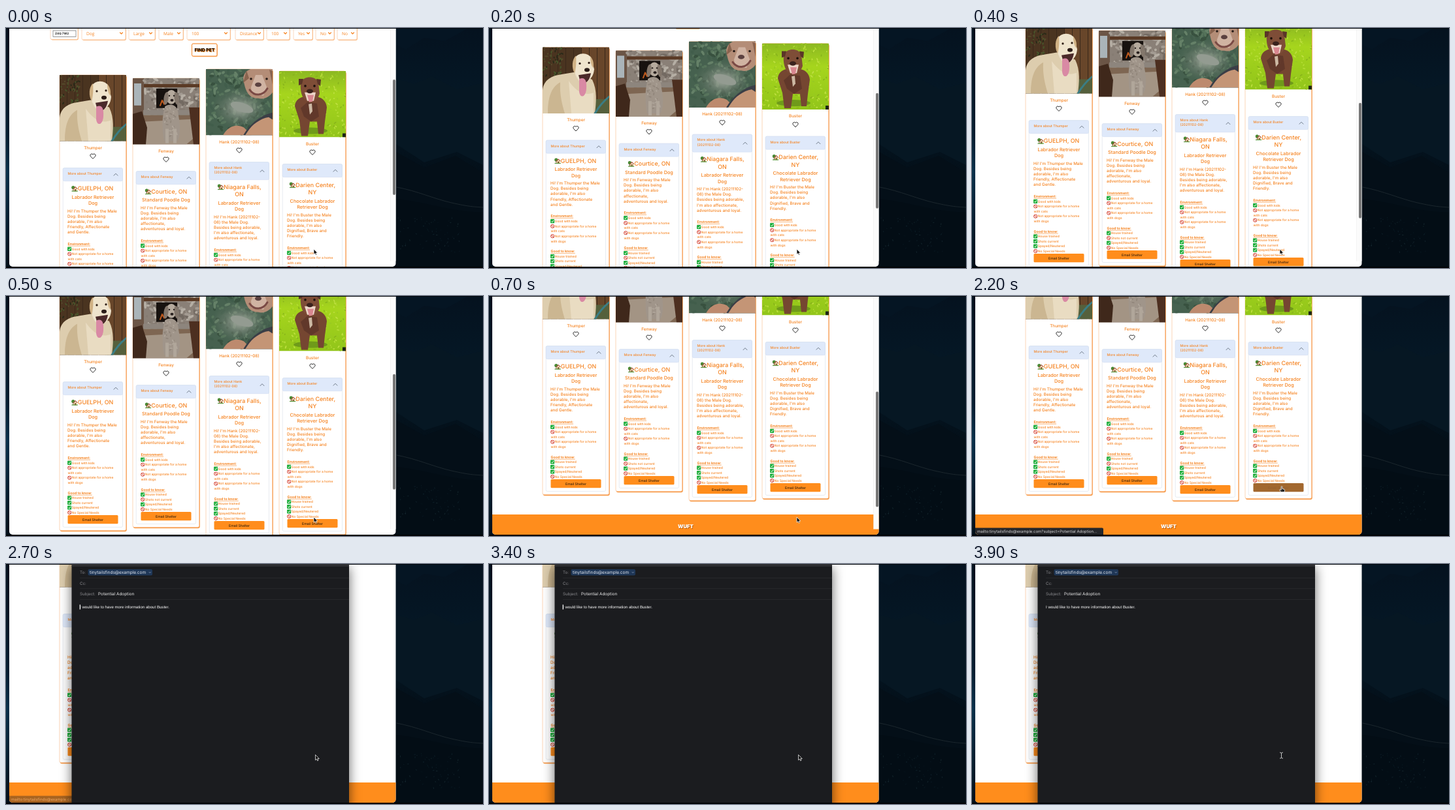
Animation, 730 px wide and 368 px high, one loop 4000 ms. Source, as an HTML page:

```html
<!DOCTYPE html>
<html lang="en">
<head>
<meta charset="utf-8">
<title>Pet finder</title>
<style>
html, body { margin: 0; width: 100%; height: 100%; overflow: hidden; background: #020408; }
svg#stage { display: block; width: 730px; height: 368px; }
text { font-family: Inter, "Open Sans", sans-serif; text-rendering: geometricPrecision; white-space: pre; }
#page { font-weight: 500; }
.pick { font-family: "Open Sans", sans-serif; font-stretch: 75%; }
.mono { font-family: "Liberation Sans", sans-serif; }
#sheet { filter: drop-shadow(0 5px 9px rgba(0, 0, 0, .6)); }
</style>
</head>
<body>
<svg id="stage" viewBox="0 0 730 368">
<defs>
  <clipPath id="win"><path d="M5 1H596.5V361a5 5 0 0 1-5 5H10a5 5 0 0 1-5-5Z"/></clipPath>
  <linearGradient id="night" x1="0" y1="0" x2="0" y2="1">
    <stop offset="0" stop-color="#05121f"/><stop offset=".3" stop-color="#051826"/>
    <stop offset=".65" stop-color="#030e17"/><stop offset="1" stop-color="#020a12"/>
  </linearGradient>
  <linearGradient id="edge" x1="0" y1="0" x2="0" y2="1">
    <stop offset="0" stop-color="#03101d"/><stop offset=".45" stop-color="#051e31"/>
    <stop offset=".6" stop-color="#08304a"/><stop offset="1" stop-color="#030f19"/>
  </linearGradient>
  <linearGradient id="grass" x1="0" y1="0" x2="0" y2="1">
    <stop offset="0" stop-color="#8cb821"/><stop offset=".35" stop-color="#a6d51d"/><stop offset="1" stop-color="#92c51a"/>
  </linearGradient>
  <radialGradient id="mist"><stop offset="0" stop-color="#a9aea4"/><stop offset="1" stop-color="#5d6f5f" stop-opacity="0"/></radialGradient>
  <symbol id="yes" viewBox="0 0 10 10"><rect width="10" height="10" rx="1.8" fill="#1fae3c"/><path d="M2.2 5.2 4.2 7.5 8 2.3" fill="none" stroke="#fff" stroke-width="1.5"/></symbol>
  <symbol id="no" viewBox="0 0 10 10"><circle cx="5" cy="5" r="4.1" fill="#fff3ee" stroke="#cf3528" stroke-width="1.5"/><path d="M2.2 2.2 7.8 7.8" stroke="#cf3528" stroke-width="1.5"/></symbol>
  <symbol id="home" viewBox="0 0 10 10">
    <circle cx="2.8" cy="3.6" r="2.6" fill="#4b8a35"/><path d="M2.4 5h1v4h-1Z" fill="#6e4526"/>
    <path d="M3.5 5H9V9.3H3.5Z" fill="#ead3a6"/><path d="M2.6 5.4 6.2 2 9.8 5.4 9 6.1 6.2 3.6 3.4 6.1Z" fill="#a8452d"/>
    <path d="M5.2 6.3h1.8v3H5.2Z" fill="#74462c"/><path d="M.5 8.4h9.3v1.4H.5Z" fill="#5a9a3f"/>
  </symbol>
  <symbol id="heart" viewBox="0 0 10 10"><path d="M5 9 1.4 5.3A2.2 2.2 0 0 1 5 2.4 2.2 2.2 0 0 1 8.6 5.3Z" fill="none" stroke="#222" stroke-width=".95" stroke-linejoin="round"/></symbol>
</defs>
<g id="scene"></g>
</svg>
<script>
const ORANGE = '#f5821f', FILL = '#ff8d1c';
const REST = 138; // scroll distance of the page's resting layout
const MAIL = 'tinytailsfinds@example.com';

const rect = (x, y, w, h, fill, more = '') =>
  `<rect x="${x}" y="${y}" width="${w}" height="${h}" fill="${fill}" ${more}/>`;
const path = (d, fill, more = '') => `<path d="${d}" fill="${fill}" ${more}/>`;
const line = (d, stroke, w = 1) => path(d, 'none', `stroke="${stroke}" stroke-width="${w}" stroke-linecap="round" stroke-linejoin="round"`);
const oval = (x, y, rx, ry, fill, turn = 0) =>
  `<ellipse cx="${x}" cy="${y}" rx="${rx}" ry="${ry}" fill="${fill}" transform="rotate(${turn} ${x} ${y})"/>`;
const use = (id, x, y, s) => `<use href="#${id}" x="${x}" y="${y}" width="${s}" height="${s}"/>`;
// y is the middle of the line
const text = (x, y, s, size, fill = ORANGE, more = '') =>
  `<text x="${x}" y="${y + size * .36}" font-size="${size}" fill="${fill}" ${more}>${s}</text>`;
const MID = 'text-anchor="middle"';

function rng(seed) {
  return () => (seed = (seed * 16807) % 2147483647) / 2147483647;
}
function specks(n, seed, x, y, w, h, size, colors) {
  const r = rng(seed);
  let out = '';
  for (let i = 0; i < n; i++)
    out += oval((x + r() * w).toFixed(1), (y + r() * h).toFixed(1), (size * (.4 + r())).toFixed(1), (size * .5).toFixed(1),
      colors[i % colors.length], Math.round(r() * 180));
  return out;
}

const photos = [
  () => {
    let s = rect(0, 0, 102, 102, '#3a281a');
    for (let i = 0; i < 9; i++) s += rect(i * 12, 0, 11, 102, i < 5 ? '#4a3420' : '#68462a');
    return s + specks(60, 7, 0, 0, 30, 45, 2.2, ['#46552a', '#2a2a18', '#54492a'])
      + rect(70, 80, 32, 22, '#55603c')
      + path('M0 102V66C2 50 14 44 28 42L52 38 76 50C84 66 82 86 80 102Z', '#ddcdae')
      + path('M8 102C8 80 12 62 27 54 26 74 30 88 34 102Z', '#cbb691')
      + path('M40 52C50 66 62 76 78 70L78 102H44Z', '#e9dcc2')
      + path('M49 18C53 7 71 7 75 18L79 34C78 44 74 48 70 52L58 54C49 46 46 30 49 18Z', '#efe4cd')
      + path('M51 13C45 18 44 32 49 40 51 34 52 23 51 13Z', '#d0b184') + path('M73 14C78 19 79 27 77 32 74 27 73 20 73 14Z', '#d0b184')
      + path('M55 43 74 40C72 52 66 58 58 54Z', '#4b2a2a') + path('M56 49C64 45 68 50 67 64 66 78 57 79 56 68Z', '#d989a4')
      + oval(57, 25, 1.6, 1.6, '#2b1a12') + oval(71, 24, 1.6, 1.6, '#2b1a12') + oval(68, 35, 4, 3, '#2a1c18')
      + line('M80 102C86 92 92 84 102 76', '#3a7d84', 3);
  },
  () => rect(0, 0, 102, 102, '#8a8077') + rect(0, 0, 17, 62, '#6b5546') + rect(2, 8, 11, 34, '#aab4b9')
    + specks(120, 31, 18, 0, 84, 58, 4, ['#a39b92', '#736a62', '#b5aea4', '#857b72'])
    + rect(17, 9, 85, 5, '#5a3a25') + rect(36, 16, 32, 30, '#17120f') + line('M42 42 45 34 48 40 50 33', '#c05a1d', 2)
    + rect(16, 49, 86, 8, '#8d857d') + rect(0, 57, 102, 45, '#7e6652') + path('M14 67 92 63 102 85 82 102H0Z', '#a39484')
    + path('M0 55 14 51 22 76 20 102H0Z', '#3f281b') + path('M86 45H102V102H93Z', '#4d2f20')
    + path('M50 43C60 37 70 43 70 58 74 78 72 92 68 97H48C44 76 45 55 50 43Z', '#a0958a')
    + specks(40, 19, 49, 45, 18, 45, 2, ['#b0a69b', '#91867b'])
    + oval(59, 29, 8, 11, '#b5aa9d') + oval(51, 31, 3.5, 10, '#83776c', 8) + oval(67, 31, 3.5, 10, '#83776c', -8)
    + oval(56, 27, 1.2, 1.2, '#211b18') + oval(63, 27, 1.2, 1.2, '#211b18') + oval(60, 34, 2.5, 2, '#29211f')
    + rect(50, 78, 5, 22, '#b0a69a') + rect(62, 78, 5, 22, '#b0a69a'),
  () => rect(0, 0, 102, 102, '#46614f') + specks(230, 53, 0, 0, 102, 102, 4, ['#55735a', '#38513f', '#658168', '#415d4b'])
    + oval(52, 60, 44, 32, 'url(#mist)') + oval(55, 59, 18, 7, '#939b91', 18)
    + path('M57 14C59 1 70 -2 82 -2H102V36C96 44 88 47 80 45 66 45 60 35 57 14Z', '#b48d77')
    + path('M62 2 57 21 66 14ZM97 1 102 3V24Z', '#8a644f')
    + path('M76 9 86 9 93 28 88 41 70 38 69 28Z', '#d0b3a2') + oval(80, 24, 5, 3.5, '#5b4140')
    + oval(69, 15, 1.8, 1.8, '#261b17') + oval(93, 15, 1.8, 1.8, '#261b17') + line('M67 32C74 42 87 42 94 30', '#7a4a45', 3)
    + path('M26 102C34 88 46 84 58 90L70 102Z', '#bd8a6e') + path('M57 102C65 88 80 72 102 67V102Z', '#3b3e46')
    + path('M64 96C70 86 83 76 96 74L102 78V102H60Z', '#c49576'),
  () => rect(0, 0, 102, 102, 'url(#grass)') + specks(200, 83, 0, 0, 102, 102, 1.9, ['#b4dc34', '#88b41b', '#bfe040', '#98c922'])
    + oval(48, 92, 26, 5, '#6f9a1a')
    + path('M24 54C25 42 36 38 46 40 62 37 72 44 73 56L70 78 68 97H60L58 78 47 78 44 100H34L31 76Z', '#754631')
    + path('M33 57 43 48 58 50 61 70 49 78 38 70Z', '#61382a')
    + path('M33 17C39 7 55 7 60 17L62 35C58 47 51 50 43 46 34 42 32 30 33 17Z', '#7e4d37')
    + path('M37 12 30 12 30 22 35 20ZM57 12 64 13 63 23 59 20Z', '#5a3527')
    + path('M39 33 56 33 53 46 43 46Z', '#ecd5c8') + path('M43 37H53L51 47 46 48Z', '#d98790')
    + oval(40, 23, 1.8, 1.8, '#1c100b') + oval(54, 23, 1.8, 1.8, '#1c100b') + oval(47, 31, 5, 3.4, '#3a221d')
    + path('M45 51 50 50 51 62 47 67Z', '#cdb9a4') + rect(97, 96, 5, 6, '#1c2514')
];

const pets = [
  { x: 82, end: 305, name: 'Thumper', titleX: 100, title: ['GUELPH, ON'], breed: ['Labrador Retriever', 'Dog'],
    bio: ["Hi! I'm Thumper the Male", 'Dog. Besides being', "adorable, I'm also", 'Friendly, Affectionate', 'and Gentle.'] },
  { x: 194, end: 300, name: 'Fenway', titleX: 212.5, title: ['Courtice, ON'], breed: ['Standard Poodle Dog'], shots: 'Shots not current',
    bio: ["Hi! I'm Fenway the Male", 'Dog. Besides being', "adorable, I'm also", 'affectionate,', 'adventurous and loyal.'] },
  { x: 306, end: 314, name: 'Hank (20211102-08)', more: ['More about Hank', '(20211102-08)'], titleX: 323.5, title: ['Niagara Falls,', 'ON'],
    breed: ['Labrador Retriever', 'Dog'],
    bio: ["Hi! I'm Hank (20211102-", '08) the Male Dog.', 'Besides being adorable,', "I'm also affectionate,", 'adventurous and loyal.'] },
  { x: 418, end: 311, name: 'Buster', titleX: 433.5, title: ['Darien Center,', 'NY'], breed: ['Chocolate Labrador', 'Retriever Dog'],
    bio: ["Hi! I'm Buster the Male", 'Dog. Besides being', "adorable, I'm also", 'Dignified, Brave and', 'Friendly.'] }
];

function card(p, i) {
  const { x, end } = p, top = 239 - end, mid = x + 51, left = x + 12.5;
  const more = p.more || ['More about ' + p.name], head = top + 142.7, headH = more.length > 1 ? 27 : 20;
  const env = end - 112, bio = env - 50.5;
  let s = rect(x + .6, top + 1, 102.2, end - top + .3, '#f79a48', 'rx="3"')
    + rect(x, top, 101.6, end - top - .4, '#fff', 'rx="2.5" stroke="#f8b987" stroke-width=".6"')
    + `<svg x="${x}" y="${top}" width="102" height="101.5" viewBox="0 0 102 102" preserveAspectRatio="none">${photos[i]()}</svg>`
    + text(mid, top + 111.3, p.name, 6.4, ORANGE, MID) + use('heart', mid - 5, top + 119.5, 10)
    + rect(x + 5.2, head, 91.3, end - 5.5 - head, '#fff', 'rx="2" stroke="#d9dfe8" stroke-width=".6"')
    + rect(x + 5.2, head, 91.3, headH, '#dfe9fa', 'rx="2" stroke="#cbd9ee" stroke-width=".5"')
    + line(`M${x + 83} ${head + headH / 2 + 1.5}l3 -3 3 3`, '#55606e', .8);
  more.forEach((m, k) => s += text(x + 12.5, head + (more.length > 1 ? 8 : 8.6) + k * 7.5, m, 5.2));
  const breedY = bio - 12 - (p.breed.length - 1) * 9.5;
  const titleY = breedY - 13 - (p.title.length - 1) * 11.5;
  s += use('home', p.titleX, titleY - 5, 10);
  p.title.forEach((t, k) => s += k ? text(mid, titleY + 11.5 * k, t, 8.9, ORANGE, MID) : text(p.titleX + 9.8, titleY, t, 8.9));
  p.breed.forEach((t, k) => s += text(mid, breedY + 9.5 * k, t, 7.3, ORANGE, MID));
  p.bio.forEach((t, k) => s += text(x + 12, bio + 8.1 * k, t, 6.3));

  const heading = (t, y) => text(left, y, t, 5.3, ORANGE, 'font-weight="700" text-decoration="underline"');
  const item = (icon, t, y) => use(icon, x + 12, y - 3.2, 6.4) + text(x + 18.7, y, t, 4.95);
  s += heading('Environment:', env) + heading('Good to know:', env + 54)
    + item('yes', 'Good with kids', env + 7.8)
    + item('no', 'Not appropriate for a home', env + 15.5) + text(left, env + 23, 'with cats', 4.95)
    + item('no', 'Not appropriate for a home', env + 30.7) + text(left, env + 38.3, 'with dogs', 4.95)
    + item('yes', 'House trained', env + 61.5)
    + item(p.shots ? 'no' : 'yes', p.shots || 'Shots current', env + 69)
    + item('yes', 'Spayed/Neutered', env + 76.5)
    + item('no', 'No Special Needs', env + 84);
  const last = i === 3;
  return s + rect(x + 12.5, end - 24, 77, 13.3, FILL, `rx="1.5" ${last ? 'id="button"' : ''}`)
    + text(mid, end - 17.3, 'Email Shelter', 5.1, '#33200e', MID + (last ? ' id="label"' : ''));
}

function filters() {
  const box = (x, y, w, h) => rect(x + .8, y + 1, w, h, '#f9ae6b', 'rx="2.5"')
    + rect(x, y, w, h, '#fff', 'rx="2" stroke="#f8c297" stroke-width=".6"');
  const picks = [[116, 183, 'Dog'], [188, 228, 'Large'], [234, 271, 'Male'], [277, 343, '100'], [351, 394, 'Distance'],
    [399, 434, '100'], [440, 469, 'Yes'], [474, 502, 'No'], [507, 537, 'No']];
  let s = box(68, -6, 42, 23.5) + rect(72, 4, 35, 9.5, '#fff', 'stroke="#555" stroke-width=".6"')
    + text(75, 8.8, 'Z4Q 7W2', 4.6, '#222', 'font-weight="700"');
  for (const [a, b, t] of picks)
    s += box(a, -6, b - a, 24) + text(a + 7, 8.5, t, 6.6, ORANGE, 'class="pick"') + line(`M${b - 8.5} 7l2 2 2 -2`, ORANGE, 1.2);
  s += box(284.5, 24, 38.5, 19.2) + rect(284.5, 24, 38.5, 19.2, 'none', 'rx="2" stroke="#f58a2c"');
  for (const [d, c] of [[.8, '#f58a2c'], [0, '#241506']])
    s += text(304 + d, 33.6 + d, 'FIND PET', 6.9, c, MID + ' font-weight="900"');
  return `<g transform="translate(0 ${-REST})">${s}</g>`;
}

const wallpaper = rect(0, 0, 730, 368, 'url(#night)') + rect(0, 0, 6, 368, 'url(#edge)')
  + path('M597 0H708L672 20 640 15 612 33 597 26Z', '#051523')
  + path('M597 78 625 86 652 74 690 94 730 84V210L690 190 640 206 597 178Z', '#061723')
  + path('M597 190 640 214 688 196 730 222V368H597Z', '#040f18')
  + path('M597 262C640 266 690 284 730 282V368H597Z', '#030d15')
  + line('M598 244C630 250 655 262 682 268S715 274 730 275', '#1f2a30', .9)
  + specks(70, 23, 600, 290, 95, 55, 1.2, ['#0d1e27', '#08161f', '#13242b'])
  + rect(0, 366, 730, 2, '#010306') + rect(0, 0, 730, 1, '#01060b');

const logo = [[.7, '#b95b09'], [0, '#fff']].map(([d, c]) =>
  text(301 + d, 353 + d, 'WUFT', 7.8, c, MID + ' font-weight="900"')).join('');

const sheet = rect(100.5, 3, 424.5, 380, '#1b1c1f') + rect(100.5, 0, 424.5, 4, '#2d2e31')
  + [21, 37.5, 54].map(y => rect(113, y, 412, .6, '#303135')).join('')
  + text(113, 12.7, 'To:', 6.2, '#8e8e92') + rect(125.5, 8, 98.5, 9.6, '#1f3757', 'rx="2"')
  + text(128, 12.8, MAIL, 6.5, '#e8edf5') + line('M219 12.4l1.2 1.2 1.2 -1.2', '#9fb3cf', .7)
  + text(113, 29.3, 'Cc:', 6.2, '#8e8e92') + text(113, 46, 'Subject:', 6.2, '#8e8e92')
  + text(141, 46, 'Potential Adoption', 6.4, '#f0f0f0')
  + text(113, 66, 'I would like to have more information about Buster.', 6.1, '#fff', 'class="mono"')
  + rect(112.7, 62.3, 1.2, 7.4, '#fff', 'id="caret"');

const pointers = {
  arrow: path('M0 0V8.2L1.9 6.5 3.1 9.2 4.5 8.6 3.3 6H5.8Z', '#111', 'stroke="#fff" stroke-width=".7"'),
  hand: path('M-.8 0C-.8 -1 .8 -1 .8 0V3L4 4C4.8 4.4 4.7 5.5 4.2 8H-1.2L-3.4 4.8C-3.2 3.8 -1.8 4 -.8 5Z', '#222', 'stroke="#fff" stroke-width=".8"'),
  beam: line('M-2 -3.5Q0 -3.5 0 -2Q0 -3.5 2 -3.5M0 -2V4M-2 5.5Q0 5.5 0 4Q0 5.5 2 5.5', '#ddd', .9)
};

document.getElementById('scene').innerHTML = wallpaper
  + `<g clip-path="url(#win)">${rect(5, 1, 592, 366, '#fff')}
    <g id="page">${filters()}${pets.map(card).join('')}${rect(5, 335, 592, 60, FILL)}${logo}</g>
    <g id="bar">${rect(588.5, 1, 8.5, 356.5, '#fbfbfb')}${rect(588.2, 1, .5, 356.5, '#e8e8e8')}
      ${rect(592, 79, 4, 177, '#777', 'rx="2" id="thumb"')}</g>
    <g id="status">${path('M5 355.5H199a2 2 0 0 1 2 2V366H5Z', '#25262a')}
      ${text(8, 361, 'mailto:' + MAIL + '?subject=Potential Adoption...', 6, '#d8d8da')}</g></g>
  <g id="sheet">${sheet}</g>${rect(0, 366, 730, 2, '#010306')}
  <g id="pointer">${Object.entries(pointers).map(([k, s]) => `<g id="${k}">${s}</g>`).join('')}</g>`;

const el = id => document.getElementById(id);
const set = (id, key, value) => el(id).setAttribute(key, value);

// [time, value] pairs, linear between
const tracks = {
  scroll: [[0, 0], [100, 24], [200, 42.5], [300, 59], [400, 73], [500, 83], [600, 118], [700, REST]],
  bar: [[1000, 1], [1300, 0]],
  x: [[1000, 471], [1800, 474], [2400, 474], [2500, 473.5]],
  y: [[1000, 339], [1500, 325], [1800, 292.5]],
  status: [[1900, 0], [2000, .6], [2100, 1], [2500, 1], [2700, .4], [2900, 0]],
  sheet: [[2200, 0], [2300, .4], [2400, .85], [2500, 1]]
};
function at(name, t) {
  const keys = tracks[name], n = keys.findIndex(k => k[0] > t);
  if (n === 0) return keys[0][1];
  if (n < 0) return keys[keys.length - 1][1];
  const [t0, a] = keys[n - 1], [t1, b] = keys[n];
  return a + (b - a) * (t - t0) / (t1 - t0);
}

function draw(t) {
  const scroll = at('scroll', t), open = at('sheet', t), zoom = .85 + .15 * open;
  set('page', 'transform', `translate(0 ${REST - scroll})`);
  set('thumb', 'y', 79 + scroll * .49);
  for (const id of ['bar', 'status', 'sheet']) set(id, 'opacity', at(id, t));
  set('sheet', 'transform', `translate(312 184) scale(${zoom}) translate(-312 -184)`);
  const dark = t >= 1800;
  set('button', 'fill', dark ? '#a2682f' : FILL);
  set('label', 'fill', dark ? '#956234' : '#33200e');
  set('caret', 'opacity', t < 2900 || (t >= 3400 && t < 3900) ? 1 : 0);
  const kind = t >= 3900 ? 'beam' : t >= 1800 && t < 2500 ? 'hand' : 'arrow';
  for (const k in pointers) set(k, 'opacity', k === kind ? 1 : 0);
  set('pointer', 'transform', `translate(${at('x', t)} ${at('y', t)})`);
}

const start = performance.now();
function tick() {
  draw(Math.floor((performance.now() - start) % 4000 / 100) * 100);
  requestAnimationFrame(tick);
}
tick();
</script>
</body>
</html>
```
